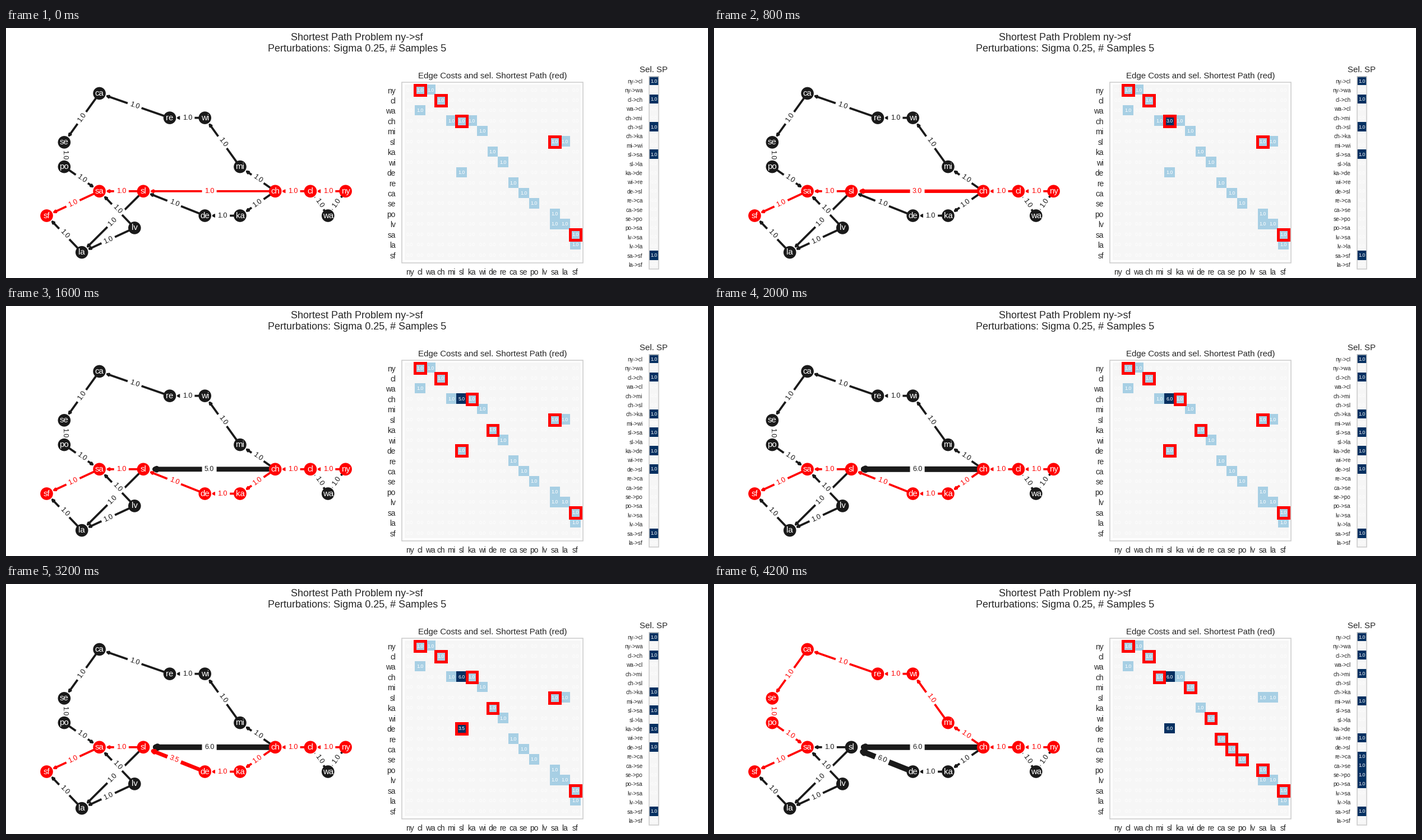
These frames come from a looping animation (1252 by 447 pixels, 4400 ms). A matplotlib script:

```python
import math

import matplotlib.pyplot as plt
import numpy as np
from matplotlib.animation import FuncAnimation
from matplotlib.patches import FancyArrowPatch, Rectangle

WIDTH, HEIGHT, DPI = 1252, 447, 72  # at 72 dpi one point is one pixel
FRAMES, INTERVAL = 22, 200
INK, GREY, RED = "#1a1a1a", "#262626", "red"

plt.rcParams["font.family"] = "Liberation Sans"

# Map position of each city in grid units
CITIES = {
    "ny": (17, 4), "cl": (15, 4), "wa": (16, 5), "ch": (13, 4), "mi": (11, 3),
    "sl": (5.5, 4), "ka": (11, 5), "wi": (9, 1), "de": (9, 5), "re": (7, 1),
    "ca": (3, 0), "se": (1, 2), "po": (1, 3), "lv": (5, 5.5), "sa": (3, 4),
    "la": (2, 6.5), "sf": (0, 5),
}
NAMES = list(CITIES)
POS = {n: (72.5 + 31.36 * x, 116.9 + 43.73 * y) for n, (x, y) in CITIES.items()}
EDGES = [tuple(e.split("-")) for e in (
    "ny-cl ny-wa cl-ch wa-cl ch-mi ch-sl ch-ka mi-wi sl-sa sl-la ka-de "
    "wi-re de-sl re-ca ca-se se-po po-sa lv-sa lv-la sa-sf la-sf").split()]

# Candidate routes; the first one wins a tie
ROUTES = [r.split() for r in (
    "ny cl ch mi wi re ca se po sa sf",
    "ny cl ch sl sa sf",
    "ny cl ch ka de sl sa sf")]

CELL, HEAT_X, HEAT_Y = 18.45, 706.3, 97.2
SEL_CELL, SEL_X, SEL_Y = 16.4, 1147.1, 86.8


def edge_costs(frame):
    """The direct edge grows first, then the last edge of the detour."""
    costs = dict.fromkeys(EDGES, 1.0)
    costs["ch", "sl"] = 1 + 0.5 * min(frame, 10)
    costs["de", "sl"] = 1 + 0.5 * max(frame - 11, 0)
    return costs


def shortest_path(costs):
    legs = [list(zip(r, r[1:])) for r in ROUTES]
    return min(legs, key=lambda path: sum(costs[e] for e in path))


def line_width(cost):
    return 1.25 * (2 + cost)


def cell_center(edge):
    row, col = (NAMES.index(n) for n in edge)
    return HEAT_X + (col + 0.75) * CELL, HEAT_Y + (row + 0.75) * CELL


fig = plt.figure(figsize=(WIDTH / DPI, HEIGHT / DPI), dpi=DPI, facecolor="white")
ax = fig.add_axes([0, 0, 1, 1])
ax.axis("off")


def label(x, y, text, size, color=GREY, ha="center", va="center", **kw):
    return ax.text(x, y, text, fontsize=size, color=color, ha=ha, va=va, **kw)


def frame_box(x, y, w, h):
    ax.add_patch(Rectangle((x, y), w, h, fill=False, ec="#cccccc", lw=1.6, zorder=2))


def image(x, y, data, cell, limit):
    rows, cols = data.shape
    return ax.imshow(data, cmap="RdBu", vmin=-limit, vmax=limit, aspect="auto",
                     interpolation="nearest", zorder=1,
                     extent=(x, x + cols * cell, y + rows * cell, y))


label(WIDTH / 2, 9, "Shortest Path Problem ny->sf\n"
      "Perturbations: Sigma 0.25, # Samples 5", 18, va="top")

# Map
arrows, edge_labels = {}, {}
for u, v in EDGES:
    arrows[u, v] = ax.add_patch(FancyArrowPatch(
        POS[u], POS[v], arrowstyle="-|>", mutation_scale=8,
        shrinkA=10.8, shrinkB=10.8, zorder=1))
for u, v in EDGES:
    (x1, y1), (x2, y2) = POS[u], POS[v]
    angle = math.degrees(math.atan2(y1 - y2, x2 - x1))
    if angle > 90:
        angle -= 180
    elif angle < -90:
        angle += 180
    edge_labels[u, v] = label(
        (x1 + x2) / 2, (y1 + y2) / 2, "1.0", 12.5, rotation=angle, zorder=1.5,
        bbox=dict(boxstyle="round", fc="white", ec="white", lw=1.25))
nodes = ax.scatter(*zip(*POS.values()), s=22.6 ** 2, linewidths=0, zorder=2)
for name, (x, y) in POS.items():
    label(x, y, name, 15, "white", zorder=3)

# Cost matrix
size = len(NAMES)
heat = image(HEAT_X + CELL / 4, HEAT_Y + CELL / 4, np.zeros((size, size)), CELL, 3)
frame_box(HEAT_X, HEAT_Y, 17.5 * CELL, 17.5 * CELL)
label(HEAT_X + 8.75 * CELL, HEAT_Y - 7.5,
      "Edge Costs and sel. Shortest Path (red)", 15, va="baseline")
heat_text, boxes = {}, {}
for u in NAMES:
    x, y = cell_center((u, u))
    label(695, y, u, 13.75, ha="right", va="center_baseline")
    label(x, 441.3, u, 13.75, va="baseline")
    for v in NAMES:
        heat_text[u, v] = label(*cell_center((u, v)), "0.0", 8.75, "white", zorder=5)
for edge in EDGES:
    x, y = cell_center(edge)
    boxes[edge] = ax.add_patch(Rectangle(
        (x - CELL / 2, y - CELL / 2), CELL, CELL, fill=False, ec=RED, lw=5, zorder=4))

# Selected edges
selection = image(SEL_X, SEL_Y, np.zeros((len(EDGES), 1)), SEL_CELL, 1)
frame_box(SEL_X, SEL_Y, SEL_CELL, len(EDGES) * SEL_CELL)
label(SEL_X + SEL_CELL / 2, SEL_Y - 7.5, "Sel. SP", 15, va="baseline")
sel_text = {}
for i, edge in enumerate(EDGES):
    y = SEL_Y + (i + 0.5) * SEL_CELL
    label(1135.5, y, "->".join(edge), 10, ha="right", va="center_baseline")
    sel_text[edge] = label(SEL_X + SEL_CELL / 2, y, "0.0", 8.75, "white")

ax.set_xlim(0, WIDTH)
ax.set_ylim(HEIGHT, 0)


def update(frame):
    costs = edge_costs(frame)
    path = shortest_path(costs)
    visited = {name for edge in path for name in edge}
    matrix = np.zeros((size, size))
    for edge, cost in costs.items():
        chosen = edge in path
        color = RED if chosen else INK
        arrows[edge].set(color=color, linewidth=line_width(cost))
        edge_labels[edge].set(text=f"{cost:.1f}", color=color)
        heat_text[edge].set_text(f"{cost:.1f}")
        boxes[edge].set_visible(chosen)
        sel_text[edge].set_text("1.0" if chosen else "0.0")
        matrix[NAMES.index(edge[0]), NAMES.index(edge[1])] = cost
    nodes.set_facecolor([RED if name in visited else INK for name in NAMES])
    heat.set_data(matrix)
    selection.set_data([[float(edge in path)] for edge in EDGES])
    return []


animation = FuncAnimation(fig, update, frames=FRAMES, interval=INTERVAL,
                          init_func=lambda: update(0), repeat=True, repeat_delay=0)
plt.show()
```
